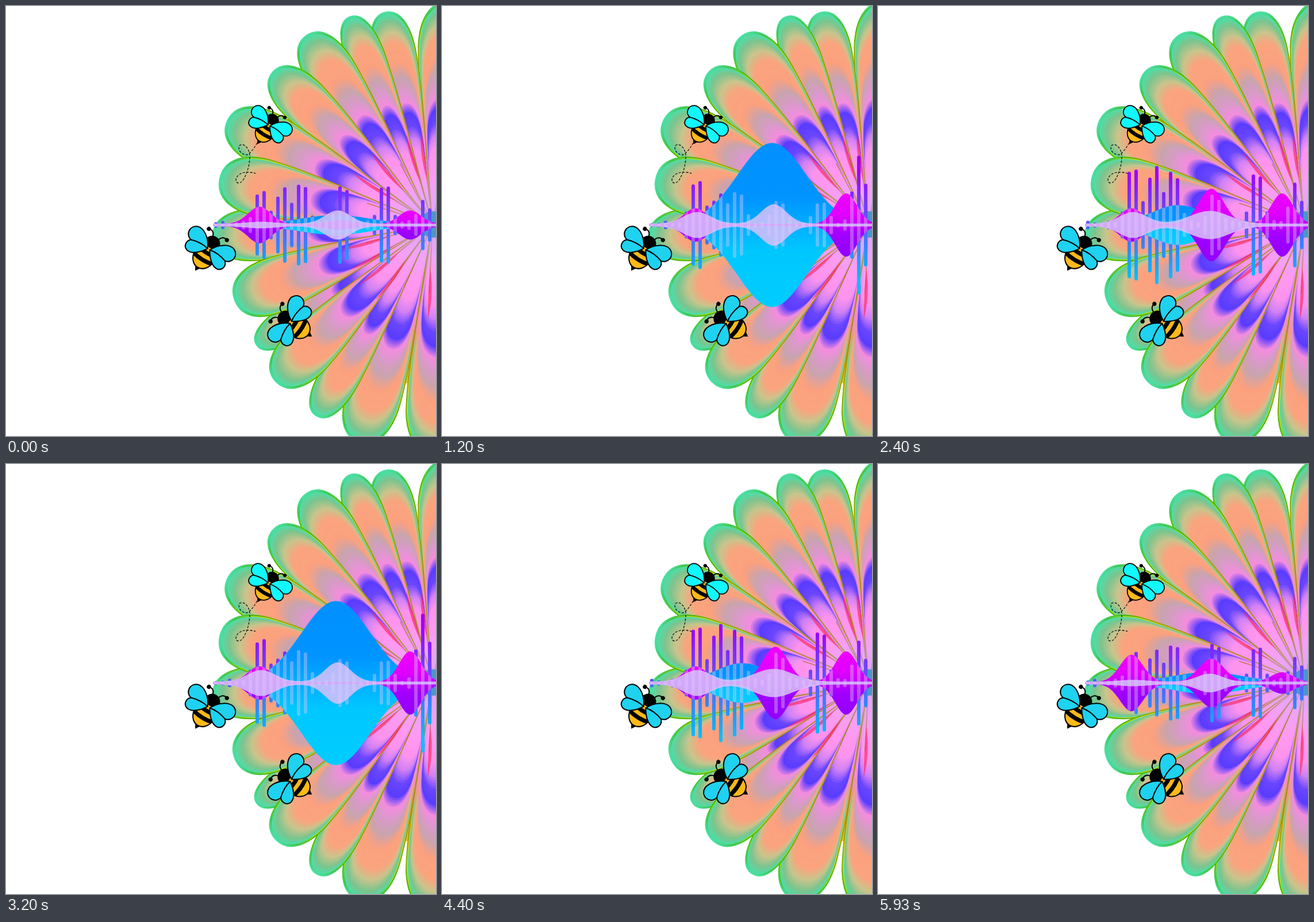
Recreate the animation shown at these times as an HTML page with a canvas. Size 748 by 748 pixels, loop 6010 ms.

```html
<!DOCTYPE html>
<html lang="en">
<head>
<meta charset="utf-8">
<title>Bees and sound waves</title>
<style>
  html, body { margin: 0; width: 100%; height: 100%; overflow: hidden; background: #fff; }
  canvas, svg { position: absolute; left: 0; top: 0; width: 748px; height: 748px; }
  .wing { fill: var(--wing); stroke: #000; stroke-width: 1.8; stroke-linejoin: round; }
  .line { fill: none; stroke: #000; stroke-width: 1.8; stroke-linecap: round; }
  .trail { fill: none; stroke: #111; stroke-width: 1.3; stroke-dasharray: 4 2.5; }
</style>
</head>
<body>
<canvas id="flower" width="748" height="748"></canvas>
<canvas id="sound" width="748" height="748"></canvas>
<svg viewBox="0 0 748 748">
  <defs>
    <clipPath id="belly"><ellipse cx="0" cy="11" rx="17" ry="21"/></clipPath>
    <g id="wing">
      <path class="wing" d="M2 -1C9 -16 23 -25 33 -22C45 -17 43 -1 31 1C37 6 36 16 28 18C18 20 8 9 2 -1Z"/>
      <path class="line" d="M2 -1Q16 -4 31 1"/>
    </g>
    <g id="feeler">
      <path class="line" d="M5 -20C6 -27 11 -30 16 -28"/>
      <circle cx="16.5" cy="-28" r="3.2"/>
    </g>
    <g id="bee">
      <use href="#feeler"/><use href="#feeler" transform="scale(-1 1)"/>
      <path d="M-6 29L0 38.5L6 29Z"/>
      <circle cy="-11" r="12.5"/>
      <ellipse cy="11" rx="17" ry="21" fill="#fdb918" stroke="#000" stroke-width="1.8"/>
      <g clip-path="url(#belly)" fill="none" stroke="#000" stroke-width="6.5">
        <path d="M-20 -9Q0 -5 20 -9M-20 3Q0 8 20 3M-20 15Q0 21 20 15"/>
      </g>
      <use href="#wing"/><use href="#wing" transform="scale(-1 1)"/>
    </g>
  </defs>
  <path class="trail" d="M437 238C430 250 425 256 419 259C408 258 403 250 406 243C412 237 424 246 424 262C424 275 420 290 414 300C410 309 400 311 400 302C401 294 412 285 434 291"/>
  <use href="#bee" style="--wing:#12f8ff" transform="translate(457 208.5) rotate(32) scale(.97)"/>
  <use href="#bee" style="--wing:#1ed2f0" transform="translate(352 424) rotate(32) scale(1.12)"/>
  <use href="#bee" style="--wing:#1ed2f0" transform="translate(496.5 551) rotate(-56) scale(1.12)"/>
</svg>
<script>
const CX = 742, CY = 380;
const mix = (a, b, u) => a + (b - a) * u;

// tip x, tip y, half width; back to front
const petals = [
  [436, 590, 30], [360, 402, 45], [775, -8, 51], [660, 11, 37], [598, 19, 33],
  [523, 51, 43], [465, 114, 41], [386, 198, 48], [372, 300, 50], [398, 512, 48],
  [762, 785, 62], [614, 758, 47], [540, 713, 34], [470, 654, 45]
];

// colour from tip to heart, by share of the petal length
const bands = [
  [.99, '#50dca6'], [.96, '#7cc48e'], [.91, '#c8c48c'], [.86, '#faa47e'], [.77, '#fba07e'],
  [.7, '#c8a4ae'], [.63, '#dc98cc'], [.58, '#f48cde'], [.53, '#5a3cff'], [.47, '#6a46ff'],
  [.41, '#d080f4'], [.35, '#fc94ee'], [.12, '#ffa2f6']
].map(([at, hex]) => [at, [1, 3, 5].map(i => parseInt(hex.slice(i, i + 2), 16))]);

function petalPath(c, len, w) {
  c.beginPath();
  c.moveTo(0, 0);
  c.bezierCurveTo(.3 * len, -.37 * w, .58 * len, -.9 * w, .8 * len, -w);
  c.bezierCurveTo(.93 * len, -1.02 * w, len, -.64 * w, len, 0);
  c.bezierCurveTo(len, .64 * w, .93 * len, 1.02 * w, .8 * len, w);
  c.bezierCurveTo(.58 * len, .9 * w, .3 * len, .37 * w, 0, 0);
  c.closePath();
}

function withStops(gradient, ...stops) {
  stops.forEach(([at, color]) => gradient.addColorStop(at, color));
  return gradient;
}
const radial = (c, r, ...stops) => withStops(c.createRadialGradient(0, 0, 0, 0, 0, r), ...stops);

// each layer shows its rounded cap and fades out towards the heart
function fillCap(c, len, w, rgb) {
  petalPath(c, len, w);
  c.fillStyle = withStops(c.createLinearGradient(0, 0, len, 0),
    [.5, `rgba(${rgb},0)`], [.8, `rgb(${rgb})`]);
  c.fill();
}

function drawPetal(c, tipX, tipY, w) {
  const dx = tipX - CX, dy = tipY - CY, len = Math.hypot(dx, dy);
  c.save();
  c.rotate(Math.atan2(dy, dx));
  petalPath(c, len, w);
  c.fillStyle = radial(c, len, [0, '#ffa2f4'], [.38, '#f68ae0'], [.52, '#e89a70'],
    [.62, '#ffba10'], [.78, '#f4dc08'], [.88, '#a0d818'], [.95, '#3cc43c'], [1, '#4ce0a8']);
  c.fill();
  c.strokeStyle = radial(c, len, [.1, '#b09030'], [.5, '#a89014'], [.72, '#94a400'],
    [.88, '#48b400'], [1, '#4ce0a8']);
  c.lineWidth = 2;
  c.stroke();
  for (let i = 0; i < bands.length - 1; i++) {
    const [from, a] = bands[i], [to, b] = bands[i + 1];
    for (let u = 0; u < 1; u += .2) {
      const f = mix(from, to, u);
      const slim = .83 + .14 * Math.max(0, (f - .8) / .2);
      fillCap(c, len * f, w * f * slim, a.map((v, j) => mix(v, b[j], u)));
    }
  }
  c.restore();
}

function drawFlower() {
  const c = document.getElementById('flower').getContext('2d');
  const disc = (r, fill) => {
    c.fillStyle = fill;
    c.beginPath();
    c.arc(0, 0, r, 0, 7);
    c.fill();
  };
  c.translate(CX, CY);
  disc(280, radial(c, 280, [0, '#ffa2f6'], [.55, '#f48ce0'], [.7, '#6a46ff'],
    [.82, '#e890c8'], [1, '#ecc020']));
  petals.forEach(p => drawPetal(c, ...p));

  // creases and red streaks around the heart
  petals.forEach(([x, y], i) => {
    c.save();
    c.rotate(Math.atan2(y - CY, x - CX) + .1);
    c.strokeStyle = 'rgba(170,116,30,.75)';
    c.lineWidth = 1.6;
    c.beginPath();
    c.moveTo(12, 0);
    c.lineTo(120, 0);
    c.stroke();
    if (i % 3 < 2) {
      c.fillStyle = 'rgba(255,40,100,.65)';
      c.beginPath();
      c.moveTo(75, 0);
      c.quadraticCurveTo(125, -9, 165, 0);
      c.quadraticCurveTo(125, 2, 75, 0);
      c.fill();
    }
    c.restore();
  });
  disc(100, radial(c, 100, [0, 'rgba(206,172,255,.75)'], [1, 'rgba(206,172,255,0)']));
  disc(23, '#4c96cc');
}

// sound: a cycle of 25 steps
const MID = 381, STEPS = 25;
const bump = (x, at, height, spread) => height * Math.exp(-(((x - at) / spread) ** 2) / 2);

// bell-shaped rise around one step, wrapping round the cycle
function pulse(step, at, spread) {
  const d = Math.abs(step - at);
  return bump(Math.min(d, STEPS - d), 0, 1, spread);
}

// groups of bars: middle bar, mean height, swing, step of the crest
const groups = [
  [6.55, 72, 30, 9], [9.7, 60, 30, 7], [12.45, 64, 16, 6],
  [18.4, 46, 18, 23], [24.5, 56, 24, 5], [30.1, 72, 38, 13]
];

function barHeight(i, step) {
  const beat = 1 + .8 * (pulse(step, 3, .9) + pulse(step, 12, .9));
  const idle = 5 + 2.5 * Math.sin(i * 2.1 + step * 2 * Math.PI / STEPS);
  return groups.reduce((sum, [at, mean, swing, crest]) => {
    const level = mean + swing * Math.cos((step - crest) * 2 * Math.PI / STEPS);
    return sum + beat * bump(i, at, level * 1.12, .85);
  }, idle);
}

const c = document.getElementById('sound').getContext('2d');
const vertical = (y0, y1, ...colors) => withStops(c.createLinearGradient(0, y0, 0, y1),
  ...colors.map((color, i) => [i / (colors.length - 1), color]));
const barFill = vertical(285, 475, '#a000ff', '#5a5cff', '#00c0ff');

function wave(height) {
  const p = new Path2D();
  p.moveTo(360, MID);
  for (let x = 360; x <= 750; x += 2) p.lineTo(x, MID - height(x));
  for (let x = 750; x >= 360; x -= 2) p.lineTo(x, MID + height(x));
  p.closePath();
  return p;
}

function fillWave(path, h, ...colors) {
  c.fillStyle = vertical(MID - h, MID + h, ...colors);
  c.fill(path);
}

function drawSound(step) {
  c.clearRect(0, 0, 748, 748);
  const surge = pulse(step, 5, 1.7), last = pulse(step, 24, .5);
  const swell = 14 + 128 * pulse(step, 14.6, 3.5) + 16 * surge;
  const left = 27 + 20 * last;
  const middle = 61 * surge + 40 * last;
  const right = 53 - 38 * pulse(step, 24.3, 1);
  const paleLeft = 3 + 17 * (surge + pulse(step, 15, 2));
  const paleMid = 22 + 14 * pulse(step, 17.5, 4) - 12 * last;

  const bars = new Path2D();
  for (let i = 0; i < 32; i++) {
    const h = barHeight(i, step);
    bars.roundRect(362 + 12 * i, MID - h, 6, 2 * h, 3);
  }
  const blue = wave(x => 1.5 + bump(x, 574 - 52 * surge, swell, 60 - 14 * surge));
  const magenta = wave(x => 2 + bump(x, 441, left, 20) + bump(x, 580, middle, 22) + bump(x, 703, right, 19));
  const pale = wave(x => 2.5 + bump(x, 444, paleLeft, 24) + bump(x, 577, paleMid, 22 + 12 * surge));

  c.fillStyle = barFill;
  c.fill(bars);
  fillWave(blue, swell, '#0090ff', '#0094ff', '#00c8ff', '#00ccff');
  fillWave(magenta, Math.max(left, middle, right), '#f000ff', '#e000ff', '#a000ff', '#9400ff');
  c.fillStyle = 'rgba(213,192,250,.87)';
  c.fill(pale);

  // bars shine through the waves
  const inside = new Path2D();
  [blue, magenta, pale].forEach(p => inside.addPath(p));
  c.save();
  c.clip(inside);
  c.fillStyle = 'rgba(222,200,255,.4)';
  c.fill(bars);
  c.restore();
}

// steps last 80 ms, held to a 30 Hz grid
let shown = -1;
function tick() {
  const t = performance.now() % 6010;
  const frame = Math.floor(t * .03 + .15);
  const step = Math.floor(frame / 2.4 + 1e-6) % STEPS;
  if (step !== shown) drawSound(shown = step);
  requestAnimationFrame(tick);
}

drawFlower();
tick();
</script>
</body>
</html>
```
